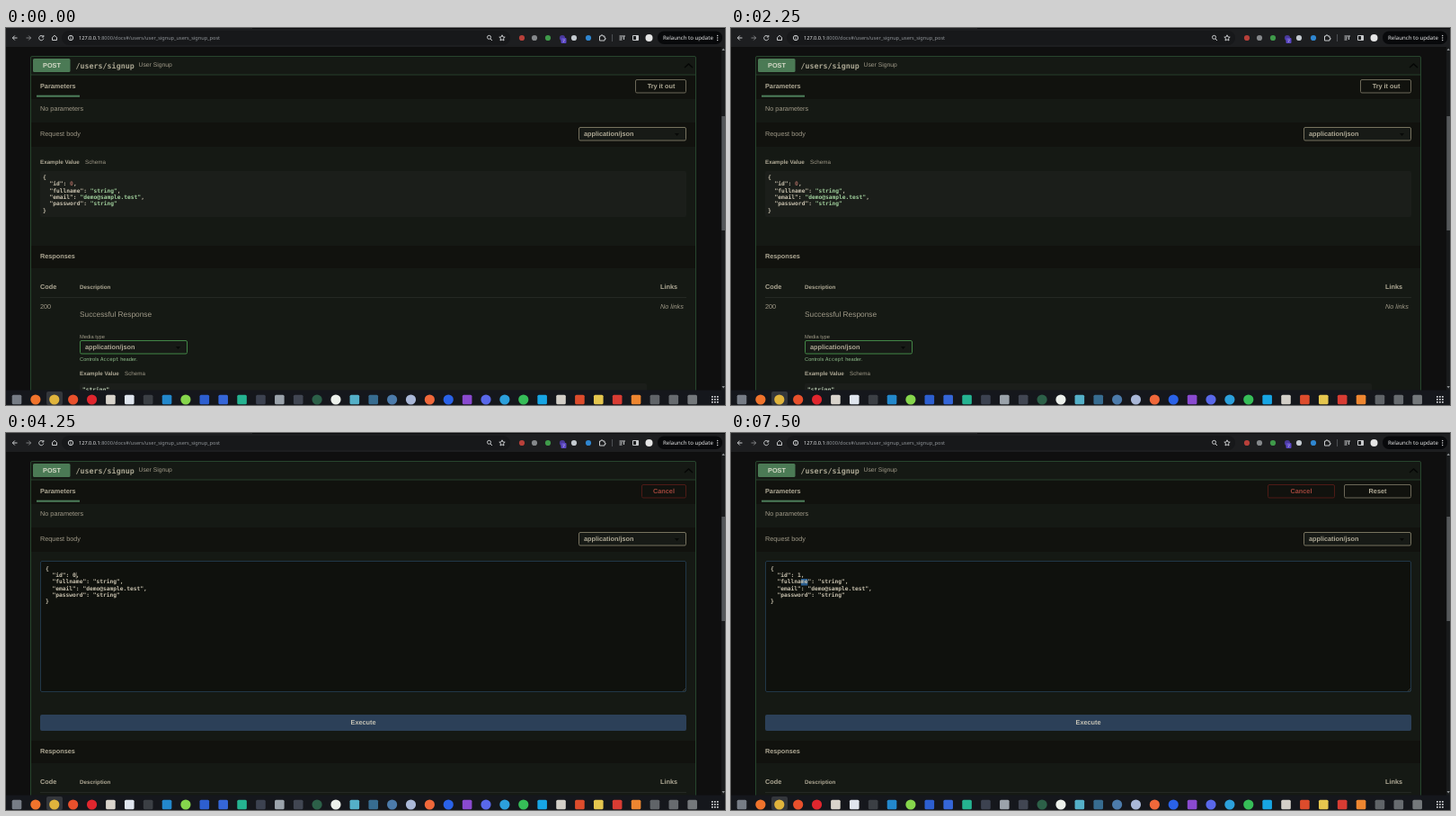
Write an HTML page that moves like this. It is 800x419 px and loops after 8 s.

```html
<!DOCTYPE html>
<html lang="en">
<head>
<meta charset="utf-8">
<title>API docs: request body editing</title>
<style>
  html, body { margin: 0; width: 100%; height: 100%; overflow: hidden; background: #0f0f0f; }
  svg { display: block; width: 800px; height: 419px; }
  text { font-family: "Liberation Sans", Arial, sans-serif; fill: #a09a88; white-space: pre; text-rendering: geometricPrecision; }
  .bold { font-weight: bold; fill: #b0aa96; }
  .mono { font-family: "DejaVu Sans Mono", monospace; font-weight: bold; fill: #c8c1ae; }
  .ui { font-family: "Noto Sans", sans-serif; fill: #e4e5e6; }
  .mid { text-anchor: middle; }
  .italic { font-style: italic; }
  .line { fill: none; stroke: #c9cbcd; stroke-width: 1; }
</style>
</head>
<body>
<svg id="stage" viewBox="0 0 800 419" xmlns="http://www.w3.org/2000/svg"></svg>
<script>
const LOOP = 8000;
const CHAR = 6.25 * 0.602;   // advance of the code font
const BLOCK = '#151914', HEAD = '#11120e', OUTLINE = '#6c6858';

const rect = (x, y, w, h, fill, more = '') =>
  `<rect x="${x}" y="${y}" width="${w}" height="${h}" fill="${fill}" ${more}/>`;
const box = (x, y, w, h, stroke, more = '') =>
  rect(x + .5, y + .5, w - 1, h - 1, 'none', `stroke="${stroke}" rx="1.5" ${more}`);
const dot = (x, y, r, fill) => `<circle cx="${x}" cy="${y}" r="${r}" fill="${fill}"/>`;
const path = (d, more = '') => `<path class="line" d="${d}" ${more}/>`;
// y is the visual middle of the line
const text = (x, y, size, content, cls = '', more = '') =>
  `<text x="${x}" y="${y + size * .35 - .4}" font-size="${size}" class="${cls}" ${more}>${content}</text>`;
const tint = (color, content) => `<tspan fill="${color}">${content}</tspan>`;

const toolbar = () => {
  const extensions = [[574, '#b8403a'], [588, '#85888b'], [603, '#3f9a4a'], [619, '#4a3a9c'], [632, '#c4cad0'], [648, '#2f86d0']];
  return rect(0, 0, 800, 21, '#1d1e20') + rect(274, 0, 526, 1, '#0b0c0e')
    + rect(62, 3, 499, 16, '#17181a', 'rx="8"')
    + path('M12.5 11H7.5M9.8 8.5L7.3 11L9.8 13.5')
    + path('M22.5 11H27.5M25.2 8.5L27.7 11L25.2 13.5', 'opacity=".55"')
    + path('M41.2 9.4A2.6 2.6 0 1 0 41.8 11.6M41.8 8V10H39.8')
    + path('M51.5 10.5L54 8.3L56.5 10.5V13.5H51.5Z')
    + '<circle class="line" cx="72" cy="11" r="2.7"/>' + path('M72 10.6V12.6M72 9.2V9.9')
    + text(81, 11.4, 5.58, '127.0.0.1' + tint('#8f9397', ':8000/docs#/users/user_signup_users_signup_post'), 'ui')
    + '<circle class="line" cx="537.5" cy="10.3" r="2"/>' + path('M539 12L541 14')
    + path('M552 7.8L553 10L555.2 10.2L553.5 11.7L554 14L552 12.8L550 14L550.5 11.7L548.8 10.2L551 10Z')
    + extensions.map(([x, color]) => dot(x, 11, 3.1, color)).join('')
    + rect(617.5, 11, 6, 6, '#5b47c4', 'rx="1"') + text(620.5, 14.4, 4.5, '7', 'ui mid')
    + path('M660.5 9H662V8H664V9H666V11H667V12.5H666V14H660.5Z')
    + rect(674, 7, 1, 8, '#4c4f53')
    + path('M682.5 9H689M682.5 11H686M682.5 13H685.5M687.5 13V9.5')
    + path('M697.5 8.5H703.5V13.5H697.5Z') + rect(701, 8.5, 2.5, 5, '#c9cbcd')
    + dot(715.5, 11, 4, '#e6e6e6')
    + rect(725, 3.5, 72, 14.5, '#08090b', 'rx="7"')
    + text(731, 11.4, 6.1, 'Relaunch to update', 'ui')
    + [8.5, 11, 13.5].map(y => dot(791.7, y, .7, '#e4e5e6')).join('');
};

const taskbar = () => {
  // a leading o marks a round icon
  const icons = ('#777d86 o#f0732c o#e0b43c o#e8502c o#e0262e #d9d4cc #dfe5ee #3b3f44 #2388cc o#86d64c #2d5fd0 #3566d8 #25b391 #3c4250 '
    + '#9ba3ab #414652 o#2c6048 o#edf1ec #54b0c8 #376c90 o#4c7bab o#aab8d8 o#f0683a o#2a62e8 #8a4ad0 o#5968ea o#2ca0dc o#36bd58 '
    + '#17a5e4 #d3cfc8 #dd4c2c #e5c64e #d83c33 #ee8630 #606468 #676b6f #74787b').split(' ');
  return rect(0, 402.5, 800, 16.5, '#15171c') + rect(45, 404, 18, 15, '#34373c', 'rx="2"')
    + icons.map((icon, i) => {
      const x = 12 + i * 20.88;
      return icon[0] === 'o' ? dot(x, 413, 5.6, icon.slice(1)) : rect(x - 5.3, 407.7, 10.6, 10.6, icon, 'rx="1.5"');
    }).join('')
    + [0, 1, 2].map(c => [0, 1, 2].map(r => rect(785 + c * 3, 409 + r * 3, 1.7, 1.7, '#d3d5d7')).join('')).join('');
};

const select = (x, y, w, stroke) =>
  box(x, y, w, 15.5, stroke, 'style="fill:#171a16"')
  + text(x + 6, y + 8, 7.29, 'application/json', 'bold')
  + `<path d="M${x + w - 13} ${y + 7}h5l-2.5 3z" fill="#070907"/>`;

const page = () => rect(0, 21, 800, 382, '#0f0f0f') + rect(27, 31, 741, 380, BLOCK, 'rx="2"')
  + rect(28, 52, 739, 27, HEAD) + rect(28, 105, 739, 27, HEAD)
  + rect(30, 34, 41.5, 15, '#4b7a55', 'rx="1.5"') + text(51, 41.5, 7.29, 'POST', 'bold mid', 'style="fill:#d6dac8"')
  + text(77.5, 42, 8.33, '/users/signup', 'mono', 'style="fill:#aaa692"')
  + text(147.5, 41.5, 6.77, 'User Signup')
  + path('M755 44L759.5 40L764 44', 'style="stroke:#050605;stroke-width:1.4"')
  + rect(28, 51.5, 739, 1, '#263f2b')
  + text(38, 65, 7.29, 'Parameters', 'bold') + rect(34, 74.7, 48, 2, '#4d7f5b')
  + text(38, 90, 7.29, 'No parameters') + text(38, 118, 7.29, 'Request body')
  + select(637, 110, 120, '#77735f')
  + box(27, 31, 741, 385, '#27452d');

const responses = y => rect(28, y - 12, 739, 25, HEAD) + text(38, y, 7.29, 'Responses', 'bold')
  + text(38, y + 34, 7.29, 'Code', 'bold') + text(82, y + 34.5, 6.25, 'Description', 'bold')
  + text(728, y + 34, 7.29, 'Links', 'bold') + rect(38, y + 45, 719, .7, '#2b302a');

const fields = id =>
  ['{', `  "id": ${id},`, '  "fullname": "string",', '  "email": "demo@sample.test",', '  "password": "string"', '}'];

const code = (x, y, step, lines) => lines.map((line, i) => text(x, y + i * step, 6.25, line, 'mono')).join('');

const highlight = line => line
  .replace(/: (".*?")/, (_, value) => ': ' + tint('#a0cf9c', value))
  .replace(/: 0/, ': ' + tint('#a3685f', '0'));

const exampleView = () => box(700, 57, 57, 15.5, OUTLINE) + text(729, 65, 7.29, 'Try it out', 'bold mid')
  + text(38, 149, 6.25, 'Example Value', 'bold') + text(88, 149, 6.25, 'Schema')
  + rect(38, 159, 719, 51, '#1b1e1a', 'rx="2"') + code(41, 166, 7.4, fields(0).map(highlight))
  + responses(254)
  + text(38, 309.5, 7.29, '200') + text(728, 309.5, 7.29, 'No links', 'italic')
  + text(82, 318.4, 8.33, 'Successful Response') + text(82, 343.4, 5.73, 'Media type')
  + select(82, 347, 120, '#438747')
  + text(82, 368, 5.73, 'Controls <tspan font-family="DejaVu Sans Mono, monospace">Accept</tspan> header.', '', 'style="fill:#8cba88"')
  + text(82, 384, 6.25, 'Example Value', 'bold') + text(132, 384, 6.25, 'Schema')
  + rect(82, 395, 631, 12, '#1b1e1a', 'rx="2"') + text(85, 402.5, 6.25, tint('#c5d8bd', '"string"'), 'mono');

// last value whose start time has passed
const valueAt = (t, steps) => steps.reduce((value, [start, next]) => t >= start ? next : value, steps[0][1]);
const mix = (a, b, k) => `rgb(${a.map((v, i) => Math.round(v + (b[i] - v) * k))})`;

const button = (x, w, label, border, color) => box(x, 57, w, 15.5, border)
  + text(x + w / 2, 65, 7.29, label, 'bold mid', `style="fill:${color}"`);

const buttons = t => {
  const red = valueAt(t, [[0, 0], [2630, .7], [2750, 1]]);
  const border = mix([108, 104, 88], [78, 27, 22], red);
  const color = mix([176, 170, 150], [160, 70, 60], red);
  if (t < 5130) return button(707, 50, 'Cancel', border, color);
  const w = valueAt(t, [[5130, 50], [5250, 67], [5380, 74], [5500, 75]]);
  return button(597, w, 'Cancel', border, color) + button(607 + w, 150 - w, 'Reset', OUTLINE, '#b0aa96');
};

const editor = t => {
  const focused = t >= 4250;
  const x = focused ? 44 : 43, y = focused ? 151 : 150;
  const id = valueAt(t, [[0, '0'], [5130, ''], [5880, '1']]);
  const selected = valueAt(t, [[0, 0], [7000, 2], [7250, 3], [7500, 2]]);
  // [column, line] of the caret, or null while hidden
  const caret = valueAt(t, [[0, null], [4250, [9, 1]], [4750, null], [5130, [8, 1]], [5880, [9, 1]], [6000, [9, 2]], [6380, null]]);
  return rect(38, 142, 719, 146, '#0f110d', 'rx="2"')
    + (focused ? box(38, 142, 719, 146, '#213748') : '')
    + (selected ? rect(x + 9 * CHAR, 162, selected * CHAR, 7.5, '#285c8e') : '')
    + code(x, y, 7.25, fields(id))
    + (caret ? rect(x + caret[0] * CHAR, y - 3.5 + caret[1] * 7.25, .5, 7.5, '#c8c1ae') : '')
    + path('M753 287L756 284M755 287L756 286', 'style="stroke:#5b5d57;stroke-width:.6"');
};

const editView = t => buttons(t) + editor(t)
  + rect(38, 313, 719, 18, '#2c4058', 'rx="2"') + text(397.5, 322, 7.29, 'Execute', 'bold mid', 'style="fill:#c6c3b6"')
  + responses(354);

const scrollbar = editing => rect(796, 21, 4, 382, '#191b1c')
  + (editing ? rect(796.3, 93, 3.7, 116, '#55585a') : rect(796.3, 98, 3.7, 127, '#55585a'))
  + '<path d="M796.5 25l1.7-2.5l1.7 2.5zM796.5 398l1.7 2.5l1.7-2.5z" fill="#8b8e90"/>';

const stage = document.getElementById('stage');
const base = page(), chrome = toolbar() + taskbar(), example = exampleView();
let shown = '';

function frame(now) {
  const t = now % LOOP;
  const editing = t >= 2500;
  const picture = base + (editing ? editView(t) : example) + scrollbar(editing) + chrome;
  if (picture !== shown) stage.innerHTML = shown = picture;
  requestAnimationFrame(frame);
}
frame(0);
</script>
</body>
</html>
```
